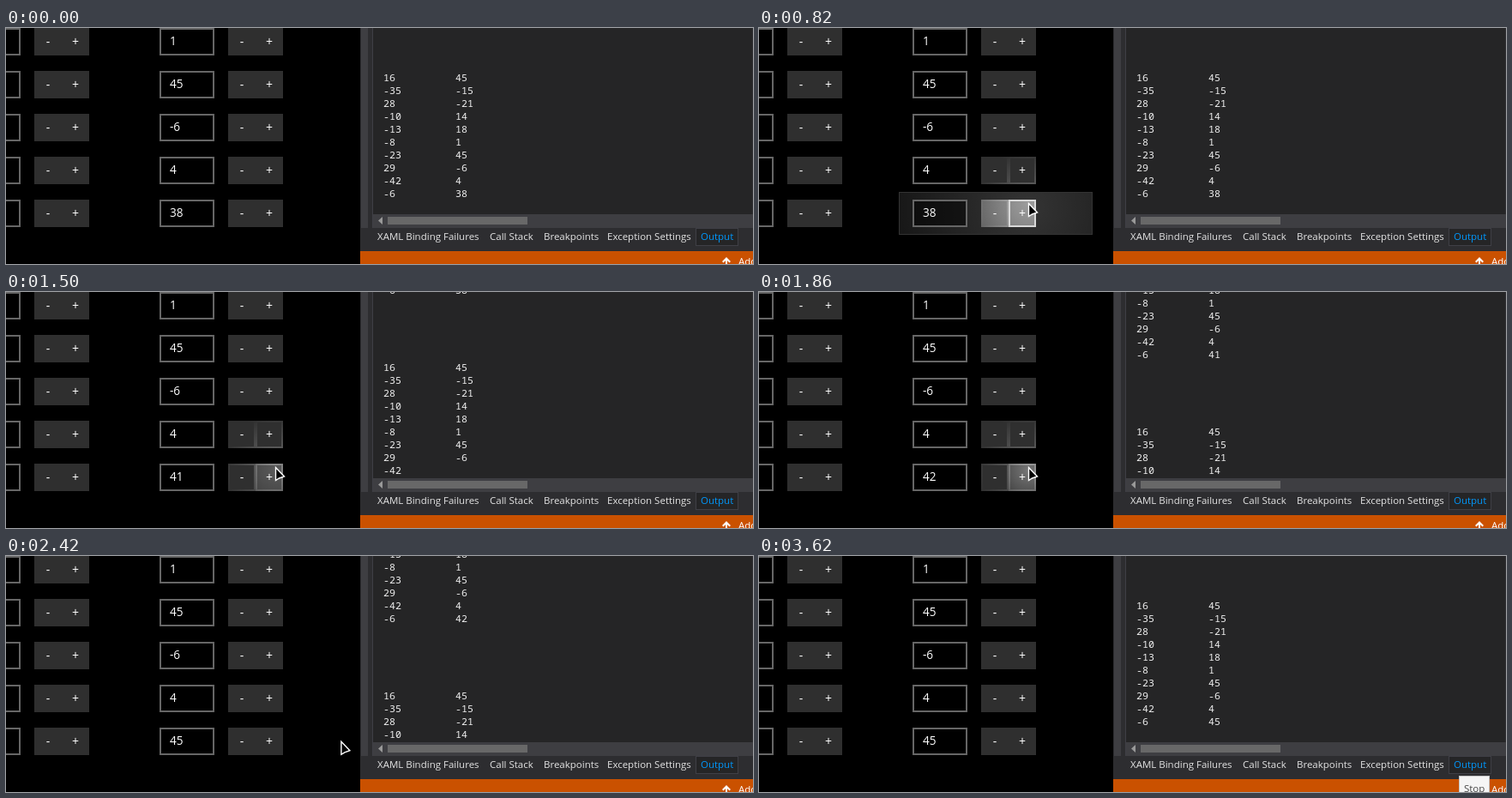
Write an HTML page with a canvas that moves like this. It is 871 by 275 pixels and loops after 3670 ms.

```html
<!DOCTYPE html>
<html>
<head>
<meta charset="utf-8">
<style>
html, body { margin: 0; width: 100%; height: 100%; overflow: hidden; background: #000; }
canvas { display: block; }
</style>
</head>
<body>
<canvas id="stage" width="871" height="275"></canvas>
<script>
const c = document.getElementById('stage').getContext('2d');
const LOOP = 3670;
const UI = '"Open Sans", "Noto Sans", sans-serif';
const MONO = '"Noto Sans Mono", "DejaVu Sans Mono", monospace';

const left = [16, -35, 28, -10, -13, -8, -23, 29, -42, -6];
const right = [45, -15, -21, 14, 18, 1, 45, -6, 4];
const printed = [38, 41, 42, 45];                        // last value of each dump
const clicks = [1000, 1110, 1220, 1570, 1890, 2000, 2150]; // button releases
const PRESS = 90;

// Share of the way from the plus button to the bottom edge
const pathKeys = [[310, 1], [450, .6], [600, .15], [720, 0], [2340, 0], [2450, .25], [2600, .947], [2650, 1.04]];
// Number of the console line being written
const lineKeys = [[1100, 10], [1500, 23.3], [1540, 23.4], [1860, 33.9], [2000, 38.6], [2100, 38.6],
  [2240, 45.3], [2330, 45.4], [2600, 55]];

function track(keys, t) {
  if (t <= keys[0][0]) return keys[0][1];
  for (let i = 1; i < keys.length; i++) {
    const [t0, a] = keys[i - 1], [t1, b] = keys[i];
    if (t < t1) return a + (b - a) * (t - t0) / (t1 - t0);
  }
  return keys[keys.length - 1][1];
}

function box(x, y, w, h, fill) {
  c.fillStyle = fill;
  c.fillRect(x, y, w, h);
}

function frame(x, y, w, h, stroke, line) {
  c.strokeStyle = stroke;
  c.lineWidth = line;
  c.strokeRect(x + line / 2, y + line / 2, w - line, h - line);
}

function text(s, x, y, size, color = '#fff', family = UI, align = 'left') {
  c.font = size + 'px ' + family;
  c.fillStyle = color;
  c.textAlign = align;
  c.fillText(s, x, y);
}

function shape(points, fill) {
  c.beginPath();
  points.forEach(([x, y]) => c.lineTo(x, y));
  c.closePath();
  c.fillStyle = fill;
  c.fill();
}

function glow(x, y, r, alpha) {
  const g = c.createRadialGradient(x, y, 0, x, y, r);
  g.addColorStop(0, `rgba(255,255,255,${alpha})`);
  g.addColorStop(1, 'rgba(255,255,255,0)');
  return g;
}

function stepper(x, y) {
  box(x, y, 64, 32, 'rgba(255,255,255,.185)');
}

function signs(x, y) {
  text('-', x + 16, y + 20.5, 14, '#fff', UI, 'center');
  text('+', x + 48, y + 20.5, 14, '#fff', UI, 'center');
}

function drawForm(t, mx, my, shown) {
  const over = shown && mx < 388;
  const onPlus = shown && mx < 323;
  const lit = over && (t < 950 || t > 2340);
  const release = clicks.find(r => t >= r - PRESS && t < r);
  const value = 38 + clicks.filter(r => t >= r).length;

  box(0, 0, 413, 275, '#000');
  if (lit) {
    box(163, 191, 226, 50, '#181818');
    box(163, 191, 226, 50, glow(mx, my + 6, 150, .12));
    frame(163, 191, 226, 50, '#333', 1);
  }
  [1, 45, -6, 4, value].forEach((v, i) => {
    const y = i * 50;
    frame(-47, y, 64, 32, '#666', 2);
    stepper(33, y);
    signs(33, y);
    box(181, y + 2, 60, 28, lit && i === 4 ? 'rgba(0,0,0,.5)' : '#000');
    frame(179, y, 64, 32, '#666', 2);
    text(v, 191, y + 20, 13.6);
    stepper(259, y);
    if (over && i > 2) {
      const edge = glow(mx, my, 62, .3);
      frame(259, y, 32, 32, edge, 2);
      frame(291, y, 32, 32, edge, 2);
    }
    if (i === 4) {
      if (lit) box(259, y, 32, 32, glow(mx, my, 85, .42));
      if (release) {
        const held = (t - release + PRESS) / PRESS;
        box(291, y, 32, 32, 'rgba(255,255,255,.1)');
        box(291, y, 32, 32, glow(mx, my + 4, 34, .04 + .34 * held));
      } else if (onPlus) {
        box(291, y, 32, 32, lit ? 'rgba(255,255,255,.26)' : 'rgba(255,255,255,.12)');
        box(291, y, 32, 32, glow(mx, my, 36, .2));
        frame(291, y, 32, 32, lit ? '#d8d8d8' : '#9a9a9a', 2);
      }
    }
    signs(259, y);
  });
}

function drawConsole(t) {
  const pos = track(lineKeys, t);
  const last = Math.floor(pos);
  box(413, 0, 458, 275, '#2d2d30');
  box(414, 0, 8, 233, '#3e3e42');
  box(427, 0, 1, 233, '#3f3f46');
  box(428, 0, 442, 217, '#252526');
  c.save();
  c.beginPath();
  c.rect(428, 0, 442, 217);
  c.clip();
  for (let n = Math.max(0, last - 15); n <= last; n++) {
    const row = n % 15, dump = Math.floor(n / 15);
    if (row > 9) continue;
    const y = 62 + 15 * (n - last + 10);
    text(left[row], 440, y, 11.67, '#f1f1f1', MONO);
    if (n < last || pos - n > .5)
      text(row < 9 ? right[row] : printed[dump], 524, y, 11.67, '#f1f1f1', MONO);
  }
  c.restore();

  box(428, 217, 443, 16, '#3e3e42');
  box(445, 220, 163, 9, '#686868');
  shape([[434, 224.5], [439, 220], [439, 229]], '#999');
}

function drawTabs() {
  const tabs = [['XAML Binding Failures', 433], ['Call Stack', 564], ['Breakpoints', 627], ['Exception Settings', 701]];
  tabs.forEach(([s, x]) => text(s, x, 247, 11.5, '#e4e4e4'));
  box(804, 233, 50, 21, '#252526');
  frame(804, 233, 50, 21, '#3f3f46', 1);
  text('Output', 810, 247, 11.5, '#0097fb');

  box(413, 260, 458, 15, '#ca5100');
  shape([[840, 267], [845, 272], [843.5, 273.5], [841, 271], [841, 275], [839, 275], [839, 271],
    [836.5, 273.5], [835, 272]], '#fff');
  text('Add to', 854, 276, 11.5);
}

function drawTip(t) {
  if (t < 3400) return;
  c.globalAlpha = Math.min(1, (t - 3340) / 280);
  box(816, 256, 36, 24, '#f5f5f5');
  frame(816, 256, 36, 24, '#c4c4c4', 1);
  text('Stop', 822, 275, 11.5, '#484848');
  c.globalAlpha = 1;
}

function drawPointer(x, y) {
  c.save();
  c.translate(x, y);
  shape([[.5, .5], [.5, 15.5], [4.5, 13], [10.5, 11]], '#000');
  c.strokeStyle = '#fff';
  c.lineWidth = 1.4;
  c.stroke();
  c.restore();
}

function draw(t) {
  const p = track(pathKeys, t);
  const mx = 314 + 415 * p, my = 204 + 64 * p;
  const shown = t >= 310 && t < 2700;
  drawForm(t, mx, my, shown);
  drawConsole(t);
  drawTabs();
  drawTip(t);
  if (shown) drawPointer(mx, my);
}

const start = performance.now();
function tick() {
  draw((performance.now() - start) % LOOP);
  requestAnimationFrame(tick);
}
tick();
</script>
</body>
</html>
```
